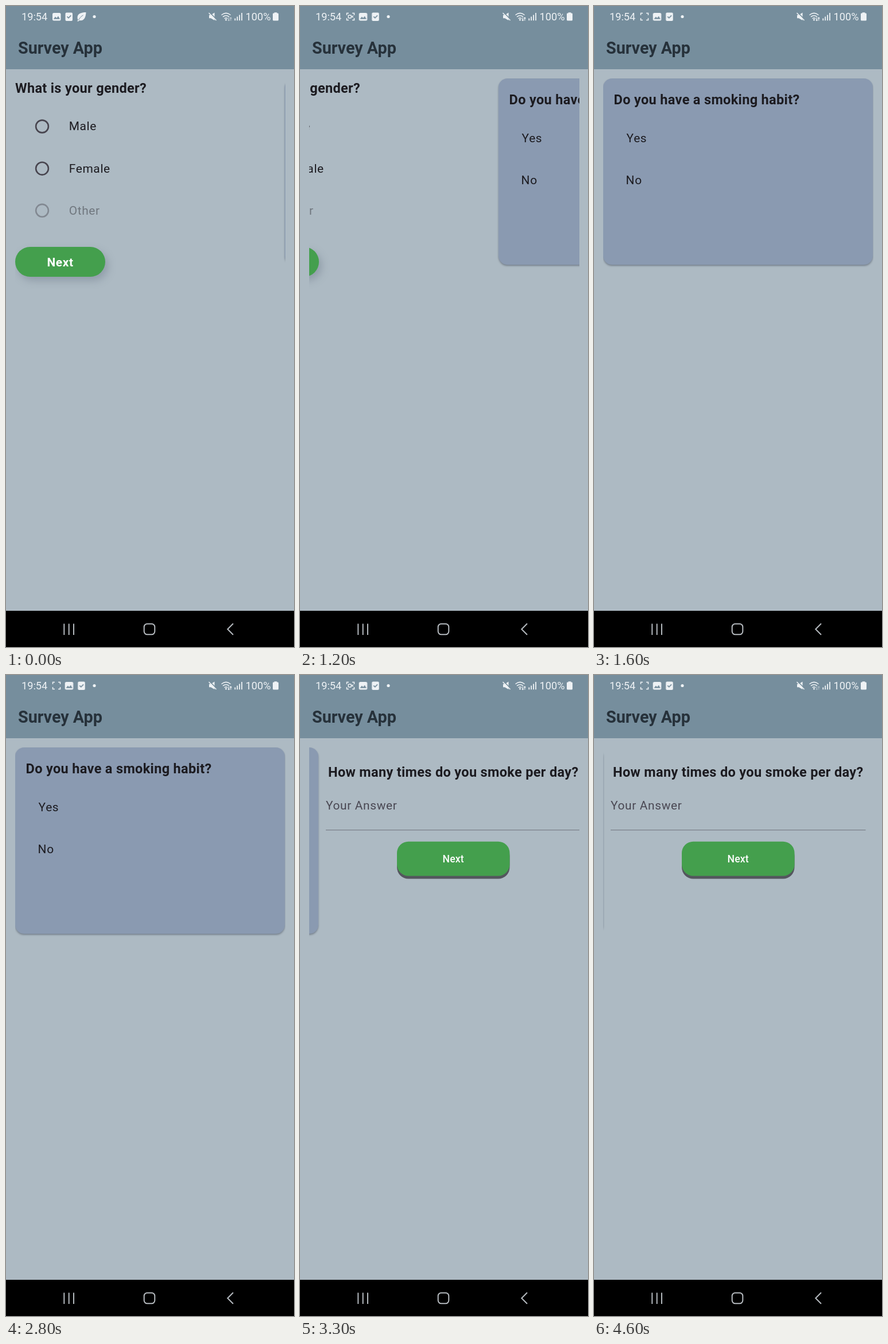
Write an HTML page that moves like this. It is 502 px wide and 1115 px high and loops after 5000 ms.

```html
<!DOCTYPE html>
<html lang="en">
<head>
<meta charset="utf-8">
<title>Survey</title>
<style>
  html, body { margin: 0; width: 100%; height: 100%; overflow: hidden; background: #adbac3; }
  svg { display: block; width: 502px; height: 1115px; }
  text { font-family: Roboto, Inter, sans-serif; fill: #1c1b20; }

  .status text { font-size: 18.2px; fill: #eef2f5; }
  .icon { fill: #eef2f5; }
  .cut { fill: none; stroke: #768e9d; stroke-width: 1.7; }
  .line { fill: none; stroke: #eef2f5; stroke-width: 1.5; }
  .title { font-size: 28.75px; font-weight: 700; fill: #26313a; }
  .question { font-size: 23.53px; font-weight: 700; letter-spacing: .327px; }
  .option { font-size: 20.9px; letter-spacing: .65px; }
  .hint { fill: #4a4853; }
  .ring { fill: none; stroke: #48454f; stroke-width: 2.6; }
  .off { opacity: .42; }
  .green { fill: #449f4d; }
  .next { font-weight: 700; fill: #fff; }
  .small { font-size: 17.6px; font-weight: 500; letter-spacing: .13px; }
  .card { fill: #8a9ab1; filter: drop-shadow(0 2px 1.5px rgba(50, 60, 75, .45)); }
  .pill { filter: drop-shadow(5px 7px 7px rgba(85, 95, 115, .32)); }
  .nav { fill: none; stroke: #b5babf; stroke-width: 2; }

  .pages, .slide, .leaf, .rec, .lens, .data { animation: 5s step-end infinite; }
  .pages { animation-name: pages; }
  .slide { animation-name: slide; }
  .leaf { animation-name: leaf; }
  .rec { animation-name: rec; transform-origin: 88px 18.5px; }
  .lens { animation-name: blink; animation-duration: 1s; }
  .data { animation-name: data; }

  /* page width is 470px; each turn eases out over about 300ms */
  @keyframes pages {
    0%   { transform: translateX(0); }
    24%  { transform: translateX(-140px); }
    26%  { transform: translateX(-390px); }
    28%  { transform: translateX(-467px); }
    30%  { transform: translateX(-470px); }
    62%  { transform: translateX(-536px); }
    64%  { transform: translateX(-830px); }
    66%  { transform: translateX(-924px); }
    68%, 100% { transform: translateX(-940px); }
  }
  @keyframes slide {
    0% { transform: translateX(0); }
    2% { transform: translateX(7px); }
    4% { transform: translateX(15px); }
    6%, 100% { transform: translateX(21.7px); }
  }
  @keyframes leaf {
    0% { opacity: 1; }
    2% { opacity: .5; }
    4%, 100% { opacity: 0; }
  }
  @keyframes rec {
    0% { transform: scale(0); }
    2% { transform: scale(.35); }
    4% { transform: scale(.7); }
    6%, 100% { transform: scale(1); }
  }
  @keyframes blink {
    0%  { opacity: 0; }
    10% { opacity: 1; }
    60%, 100% { opacity: 0; }
  }
  @keyframes data {
    0%  { opacity: .6; }
    2%  { opacity: 1; }
    80%, 100% { opacity: .4; }
  }
</style>
</head>
<body>
<svg viewBox="0 0 502 1115">
  <defs>
    <clipPath id="view"><rect x="16" y="110" width="470.5" height="942"/></clipPath>
  </defs>
  <rect width="502" height="1115" fill="#adbac3"/>
  <rect width="502" height="110" fill="#768e9d"/>

  <g class="status">
    <text x="27" y="25.2">19:54</text>
    <g class="rec">
      <path class="line" d="M81.5 16V12.5H85M91 12.5H94.5V16M94.5 21V24.5H91M85 24.5H81.5V21"/>
      <g class="lens">
        <rect class="line" x="84.3" y="16" width="5" height="5" rx="1"/>
        <path class="icon" d="M89.5 18.5L92.5 16V21Z"/>
      </g>
    </g>
    <g class="slide">
      <rect class="icon" x="81" y="12" width="14.5" height="13.5" rx="2.5"/>
      <path d="M82.8 22.8L86 18.6L88.3 21L91 17.4L94 22.8Z" fill="#768e9d"/>
      <rect class="icon" x="103.5" y="11.5" width="12.5" height="14.5" rx="2"/>
      <path class="cut" d="M106.5 18.3L109 20.8L113.3 16.3"/>
      <g class="leaf">
        <path class="icon" d="M139.5 11C131 11 124.5 13.5 124.5 20C124.5 22 125 23 125.8 24L124 26.5H126.5L128 25C136 26.5 139 20 139.5 11Z"/>
        <path class="cut" style="stroke-width:1" d="M126.5 24.5C128.5 20.5 131 18 134.5 16"/>
      </g>
    </g>
    <circle class="icon" cx="154" cy="18.5" r="2.6"/>

    <path class="icon" d="M354 15.7H357L363.5 11.5V25L357 21.3H354Z"/>
    <path class="cut" d="M354.8 11L367.4 23.6"/>
    <path class="line" d="M353.5 12L366.5 25"/>
    <path class="line" d="M375.5 15.8Q383.5 9 391.5 15.8M378 18.9Q383.5 14.5 389 18.9M380.7 21.8Q383.5 19.6 386.2 21.8"/>
    <circle class="icon" cx="383.5" cy="24" r="1.5"/>
    <path class="line data" style="stroke-width:1.2" d="M388.3 20V25.5M386.8 23.8L388.3 25.5L389.8 23.8M391.8 25.5V20M390.3 21.7L391.8 20L393.3 21.7"/>
    <path class="line" style="stroke-width:1.8" d="M399.3 25.2V21.5M403.2 25.2V18.5M407.1 25.2V15.5M411 25.2V12"/>
    <text x="417.5" y="25.2">100%</text>
    <path class="icon" d="M467.6 11.3H472.4V12.6H473.6Q475 12.6 475 14V24Q475 25.6 473.4 25.6H466.6Q465 25.6 465 24V14Q465 12.6 466.4 12.6H467.6Z"/>
  </g>
  <text class="title" x="21" y="83">Survey App</text>

  <g clip-path="url(#view)">
    <g class="pages">
      <g>
        <text class="question" x="16" y="151.3">What is your gender?</text>
        <circle class="ring" cx="63" cy="209.5" r="10.9"/>
        <text class="option" x="109.7" y="216.3">Male</text>
        <circle class="ring" cx="63" cy="282.7" r="10.9"/>
        <text class="option" x="109.7" y="289.5">Female</text>
        <g class="off">
          <circle class="ring" cx="63" cy="355.8" r="10.9"/>
          <text class="option" x="109.7" y="362.7">Other</text>
        </g>
        <rect class="green pill" x="16" y="419" width="157" height="52" rx="26"/>
        <text class="option next" x="94.6" y="452.6" text-anchor="middle">Next</text>
      </g>
      <g transform="translate(470)">
        <rect class="card" x="16" y="126" width="470" height="324" rx="15.7"/>
        <text class="question" x="34.6" y="170.7">Do you have a smoking habit?</text>
        <text class="option" x="56.6" y="236.5">Yes</text>
        <text class="option" x="55.6" y="309.6">No</text>
      </g>
      <g transform="translate(940)">
        <text class="question" x="251.2" y="177.2" text-anchor="middle">How many times do you smoke per day?</text>
        <text class="option hint" x="29" y="234.4">Your Answer</text>
        <path d="M29 269.6H473.5" stroke="#7b818a" stroke-width="1.4"/>
        <rect x="153" y="295" width="196.5" height="59.5" rx="20" fill="#54565e"/>
        <rect class="green" x="153" y="289.7" width="196.5" height="59.7" rx="20"/>
        <text class="next small" x="251.2" y="326" text-anchor="middle">Next</text>
      </g>
    </g>
  </g>

  <rect y="1052" width="502" height="63"/>
  <path class="nav" d="M101.3 1074.5V1094M109.7 1074.5V1094M118 1074.5V1094"/>
  <rect class="nav" x="240.7" y="1074.7" width="18.6" height="18.6" rx="5.5"/>
  <path class="nav" d="M396 1074.3L386.3 1084L396 1093.7"/>
</svg>
</body>
</html>
```
